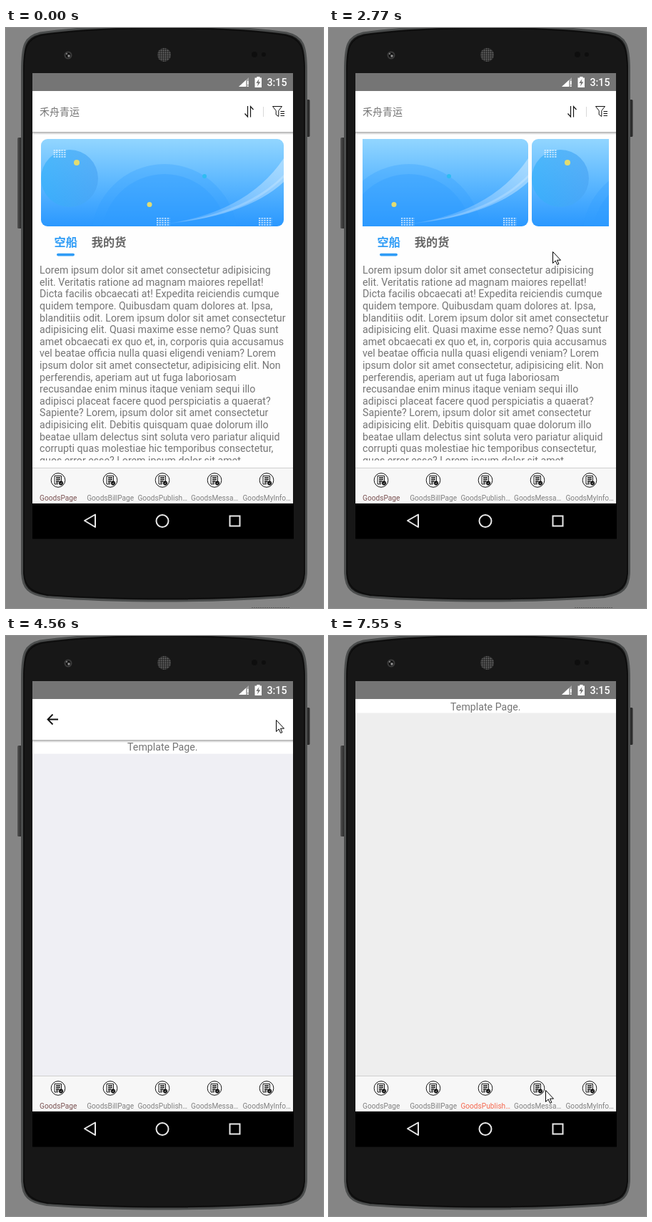
An HTML page that plays this animation: 444 px wide and 810 px high, repeating every 8000 ms.

```html
<!DOCTYPE html>
<html lang="zh">
<head>
<meta charset="utf-8">
<title>Goods app</title>
<style>
html, body { margin: 0; width: 100%; height: 100%; overflow: hidden; background: #858585; }
svg { display: block; width: 444px; height: 810px; }
text { font-family: Roboto, "Noto Sans CJK SC", "Noto Sans CJK", sans-serif; font-size: 14.2px; fill: #757575; }
.mid { text-anchor: middle; }
.cn { font-family: "Noto Sans CJK SC", "Noto Sans CJK", sans-serif; }
.tab { font-size: 16.2px; font-weight: 700; }
.label { font-size: 10.14px; fill: #808080; text-anchor: middle; }
.line { fill: none; stroke: #111; stroke-width: 1.2; }

#slides, #edge, #enter, #third, #home, #bill, #publish, #cursor {
  animation: 8s step-end infinite;
}
#slides { animation-name: slide; }
#edge { animation-name: edge; }
#enter { animation-name: enter; transform: translateY(var(--y)); }
#third { animation-name: third; }
#home { animation-name: home; }
#bill { animation-name: bill; }
#publish { animation-name: publish; }
#cursor { animation-name: move; }

@keyframes slide {
  0%, 4.75%, 36.5%, 100% { transform: none; }
  2.6%, 34.6% { transform: translateX(-110px); }
  3.6%, 35.6% { transform: translateX(-300px); }
}
@keyframes edge { 0% { opacity: 1; } 50.1%, 100% { opacity: 0; } }
/* page, panel, arrow, caption and outline opacity, then the rise */
@keyframes enter {
  0%  { --page: 0; --panel: 0; --arrow: 0; --caption: 0; --outline: 0; --y: 40px; }
  53% { --page: .12; --panel: .1; --arrow: .04; --caption: .1; --outline: 0; --y: 36px; }
  54% { --page: .62; --panel: .56; --arrow: .27; --caption: .9; --outline: 1; --y: 18px; }
  55% { --page: .96; --panel: .9; --arrow: .73; --caption: 1; --outline: .3; --y: 4px; }
  56% { --page: 1; --panel: 1; --arrow: .96; --caption: 1; --outline: 0; --y: .5px; }
  57%, 100% { --page: 1; --panel: 1; --arrow: 1; --caption: 1; --outline: 0; --y: 0px; }
}
.page { opacity: var(--page); }
.panel { opacity: var(--panel); }
.arrow { opacity: var(--arrow); }
.caption { opacity: var(--caption); }
.outline { opacity: var(--outline); }
@keyframes third { 0% { opacity: 0; } 82%, 100% { opacity: 1; } }
@keyframes home { 0% { fill: #7a5252; } 82%, 100% { fill: #808080; } }
@keyframes bill { 0%, 91.5%, 100% { fill: #808080; } 82% { fill: #f4674e; } }
@keyframes publish { 0% { fill: #808080; } 91.5%, 100% { fill: #f4674e; } }
</style>
</head>
<body>
<svg viewBox="0 0 444 810" xmlns="http://www.w3.org/2000/svg">
  <defs>
    <linearGradient id="sky" x2="0" y2="1">
      <stop offset="0" stop-color="#92d6ff"/><stop offset=".5" stop-color="#5cb7ff"/><stop offset="1" stop-color="#2a98ff"/>
    </linearGradient>
    <linearGradient id="globe" x2="1" y2="0">
      <stop offset="0" stop-color="#35b0fa"/><stop offset="1" stop-color="#4aa5f4"/>
    </linearGradient>
    <linearGradient id="trail">
      <stop offset="0" stop-color="#fff" stop-opacity=".05"/><stop offset="1" stop-color="#fff" stop-opacity=".38"/>
    </linearGradient>
    <linearGradient id="shade" x2="0" y2="1">
      <stop offset="0" stop-color="#aaa"/><stop offset="1" stop-color="#aaa" stop-opacity="0"/>
    </linearGradient>
    <linearGradient id="key"><stop offset="0" stop-color="#555"/><stop offset="1" stop-color="#222"/></linearGradient>
    <pattern id="mesh" width="3" height="3" patternUnits="userSpaceOnUse">
      <rect width="3" height="3" fill="#2a2a2a"/><circle cx="1.5" cy="1.5" r=".95" fill="#6c6c6c"/>
    </pattern>
    <pattern id="dots" width="3.7" height="3" patternUnits="userSpaceOnUse">
      <rect width="2.2" height="1.7" fill="#fff" fill-opacity=".75"/>
    </pattern>
    <clipPath id="view"><rect x="37" y="88" width="365" height="526"/></clipPath>
    <clipPath id="strip"><rect x="47" y="155" width="345" height="122"/></clipPath>
    <clipPath id="card"><rect x="49" y="155" width="340" height="122" rx="9"/></clipPath>
    <clipPath id="scroll"><rect x="37" y="320" width="365" height="284"/></clipPath>

    <g id="banner" clip-path="url(#card)">
      <rect x="49" y="155" width="340" height="122" fill="url(#sky)"/>
      <circle cx="89" cy="210" r="40" fill="url(#globe)" opacity=".7"/>
      <circle cx="222" cy="292" r="102" fill="#2f9bff" opacity=".3"/>
      <circle cx="222" cy="292" r="88" fill="#2f9bff" opacity=".35"/>
      <path d="M210 275Q335 262 389 182V215Q335 265 210 275Z" fill="url(#trail)"/>
      <path d="M240 271Q340 255 389 205V209Q335 262 240 271Z" fill="#fff" opacity=".2"/>
      <g fill="url(#dots)">
        <rect width="18.5" height="12" transform="translate(66.500 170)"/>
        <rect width="18.5" height="12" transform="translate(211 265)"/>
        <rect width="18.5" height="12" transform="translate(354 265)"/>
      </g>
      <circle cx="99" cy="188" r="4" fill="#e2dc72"/>
      <circle cx="201" cy="246.500" r="3.500" fill="#e2dc72"/>
      <circle cx="278" cy="207" r="3" fill="#2fbcf2"/>
    </g>

    <g id="bar">
      <rect x="37" y="88" width="365" height="57.500" fill="#fff"/>
      <rect x="37" y="145" width="365" height="4" fill="url(#shade)"/>
    </g>

    <g id="note" class="line" style="stroke-width:1">
      <circle r="9.800" fill="#fff"/>
      <path d="M-5 -6H4.500V1M-5 -6V5.500H0"/>
      <path d="M-3 -3.500H3M-3 -1H3M-3 1.500H1.500M-3 3.700H0" stroke-width="1.300"/>
      <circle cx="4" cy="4" r="2.700" fill="#111"/>
      <path d="M2.800 4L3.800 5L5.400 3.200" stroke="#fff" stroke-width=".7"/>
    </g>
  </defs>

  <!-- handset -->
  <rect width="444" height="810" fill="#858585"/>
  <rect x="16" y="153" width="6" height="127" rx="1.500" fill="url(#key)"/>
  <rect x="420" y="100" width="5.500" height="52" rx="1.500" fill="#2c2c2c"/>
  <path d="M22.500 60C22.500 24 26 12 48 7Q110 -2 221 -3Q332 -2 393 7C416 12 420.500 24 420.500 60V758C420.500 783 411 791 386 794.500Q310 800 221 800Q132 800 57 794.500C32 791 22.500 783 22.500 758Z" fill="#191919" stroke="#4b4d4d" stroke-width="3"/>
  <path d="M25 62C25 27 29 15 50 10Q110 1 221 0Q332 1 391 10C413 15 418 27 418 62V757C418 780 408 788 384 792Q310 797 221 797Q132 797 59 792C35 788 25 780 25 757Z" fill="#171717" stroke="#0c0c0c" stroke-width="1.500"/>
  <circle cx="87" cy="38" r="5.500" fill="#3b3b3b"/><circle cx="87" cy="38" r="3.500" fill="#111"/>
  <circle cx="88" cy="39" r="1.700" fill="#999"/><circle cx="85" cy="36" r="1.200" fill="#777"/>
  <circle cx="221.500" cy="37.500" r="9.500" fill="url(#mesh)"/>
  <circle cx="348" cy="37" r="4" fill="#0e0e0e"/><circle cx="361" cy="37" r="3" fill="#0e0e0e"/>
  <path id="edge" d="M344 809.500H397" stroke="#5c5c5c" stroke-dasharray="2 1"/>

  <!-- status bar -->
  <rect x="37" y="63" width="365" height="25" fill="#757575"/>
  <path d="M326 82L340 69V82Z" fill="#a9a9a9"/>
  <path d="M326 82L336 72.700V82Z" fill="#fff"/>
  <path d="M338.800 74V79M338.800 80.500V82" stroke="#fff" stroke-width="1.600"/>
  <path d="M348.500 69.500H351.300V68H355.500V69.500H358V83H348.500Z" fill="#fff"/>
  <path d="M354.500 71L350.300 77H353L352 81.500L356.400 75.300H353.600Z" fill="#757575"/>
  <text x="365.500" y="81" style="fill:#fff;font-weight:500">3:15</text>

  <g clip-path="url(#view)">
    <!-- first page -->
    <rect x="37" y="88" width="365" height="526" fill="#fefefe"/>
    <use href="#bar"/>
    <text class="cn" x="47" y="122" style="font-size:14px">禾舟青运</text>
    <path class="line" d="M338.500 109V124L334.500 119.500M342.500 124.500V109.500L346.500 114"/>
    <path d="M360.500 110V124" stroke="#d8d8d8"/>
    <path class="line" d="M373.500 109.500H386.500L381.800 115.500V123.500L378.200 121V115.500ZM384.500 116.500H390M384.500 119.500H390M384.500 122.500H390" style="stroke-width:1"/>
    <g clip-path="url(#strip)">
      <g id="slides"><use href="#banner"/><use href="#banner" x="345"/></g>
    </g>
    <text class="cn tab" x="67.500" y="304.500" style="fill:#2f9cf6">空船</text>
    <text class="cn tab" x="119.800" y="304.500" style="fill:#666">我的货</text>
    <rect x="71" y="314.800" width="25" height="3.600" rx="1.800" fill="#2f9cf6"/>
    <g clip-path="url(#scroll)"><text id="lorem"></text></g>

    <!-- second page -->
    <g id="enter">
      <rect class="page" x="37" y="88" width="365" height="576" fill="#efeff4"/>
      <rect class="panel" x="37" y="145" width="365" height="19.500" fill="#fff"/>
      <use class="panel" href="#bar"/>
      <path class="outline" d="M39 88.500H400M41 90L46 144M398 90L393 144" fill="none" stroke="#e4e4e4" stroke-width="1.500"/>
      <path class="line arrow" d="M73 116.500H58.500M65.500 109.500L58.500 116.500L65.500 123.500" style="stroke-width:1.800"/>
      <text class="mid caption" x="219.300" y="160">Template Page.</text>
    </g>

    <!-- tab pages -->
    <g id="third">
      <rect x="37" y="88" width="365" height="526" fill="#eee"/>
      <rect x="37" y="88" width="365" height="19.500" fill="#fff"/>
      <text class="mid" x="219.300" y="103.500">Template Page.</text>
    </g>
  </g>

  <!-- tab bar -->
  <rect x="37" y="614" width="365" height="50" fill="#f7f7f7"/>
  <path d="M37 614.500H402" stroke="#cfcfcf"/>
  <use href="#note" x="73" y="631.500"/><use href="#note" x="146" y="631.500"/>
  <use href="#note" x="219" y="631.500"/><use href="#note" x="292" y="631.500"/>
  <use href="#note" x="365" y="631.500"/>
  <text class="label" id="home" x="73.200" y="660">GoodsPage</text>
  <text class="label" id="bill" x="146.200" y="660">GoodsBillPage</text>
  <text class="label" id="publish" x="219.200" y="660">GoodsPublish…</text>
  <text class="label" x="292.200" y="660">GoodsMessa…</text>
  <text class="label" x="365.200" y="660">GoodsMyInfo…</text>

  <!-- navigation keys -->
  <rect x="37" y="664" width="366" height="49.500"/>
  <g fill="none" stroke="#e8e8e8" stroke-width="2">
    <path d="M110 688L125 679.500V697Z" stroke-linejoin="round"/>
    <circle cx="219" cy="688.500" r="8.500"/>
    <rect x="313.500" y="681.500" width="14" height="14"/>
  </g>

  <path id="cursor" d="M.5 .5V16.500L4.200 13L6.700 18.500L8.900 17.500L6.500 12.200H11.500Z" fill="#fff" stroke="#000"/>
</svg>
<script>
const LOOP = 8000;

const lines = [
  "Lorem ipsum dolor sit amet consectetur adipisicing",
  "elit. Veritatis ratione ad magnam maiores repellat!",
  "Dicta facilis obcaecati at! Expedita reiciendis cumque",
  "quidem tempore. Quibusdam quam dolores at. Ipsa,",
  "blanditiis odit. Lorem ipsum dolor sit amet consectetur",
  "adipisicing elit. Quasi maxime esse nemo? Quas sunt",
  "amet obcaecati ex quo et, in, corporis quia accusamus",
  "vel beatae officia nulla quasi eligendi veniam? Lorem",
  "ipsum dolor sit amet consectetur, adipisicing elit. Non",
  "perferendis, aperiam aut ut fuga laboriosam",
  "recusandae enim minus itaque veniam sequi illo",
  "adipisci placeat facere quod perspiciatis a quaerat?",
  "Sapiente? Lorem, ipsum dolor sit amet consectetur",
  "adipisicing elit. Debitis quisquam quae dolorum illo",
  "beatae ullam delectus sint soluta vero pariatur aliquid",
  "corrupti quas molestiae hic temporibus consectetur,",
  "quos error esse? Lorem ipsum dolor sit amet"
];
document.getElementById("lorem").innerHTML = lines
  .map((s, i) => `<tspan x="47" y="${(343.2 + i * 16.6).toFixed(1)}">${s}</tspan>`).join("");

// Pointer strokes: start, end, number of steps, points passed
const strokes = [
  [840, 990, 3, [[364, 805], [392, 776], [409, 753]]],
  [1310, 1540, 4, [[420, 750], [398, 766], [345, 772], [296, 762]]],
  [1770, 2310, 8, [[294, 742], [325, 690], [368, 645], [404, 633], [415, 650]]],
  [2460, 2920, 7, [[408, 632], [362, 510], [315, 385], [318, 280], [349, 203]]],
  [3090, 3860, 11, [[352, 195], [365, 160], [374, 128], [377, 119], [378, 117]]],
  [4780, 5550, 11, [[372, 122], [300, 185], [200, 207], [154, 190], [205, 160], [254, 154]]],
  [5620, 6080, 7, [[260, 170], [225, 330], [165, 520], [135, 620], [145, 643]]],
  [6250, 6250, 1, [[145, 644]]],
  [6710, 7100, 6, [[155, 644], [185, 640], [216, 638]]],
  [7320, 7550, 4, [[230, 642], [265, 638], [303, 634]]]
];

// Smooth curve through the points, u from 0 to 1
function along(pts, u) {
  const last = pts.length - 1;
  const i = Math.min(Math.floor(u * last), Math.max(last - 1, 0));
  const f = u * last - i;
  const at = k => pts[Math.max(0, Math.min(last, k))];
  return [0, 1].map(n => {
    const [a, b, c, d] = [at(i - 1)[n], at(i)[n], at(i + 1)[n], at(i + 2)[n]];
    return Math.round(b + f / 2 * (c - a + f * (2 * a - 5 * b + 4 * c - d + f * (3 * (b - c) + d - a))));
  });
}

let frames = "0%{opacity:0}", end;
for (const [from, to, steps, pts] of strokes) {
  for (let k = 0; k < steps; k++) {
    const u = steps > 1 ? k / (steps - 1) : 0;
    const time = Math.floor((from + (to - from) * u) / 10) * 10;
    const [x, y] = along(pts, u);
    end = `{opacity:1;transform:translate(${x}px,${y}px)}`;
    frames += `${(time / LOOP * 100).toFixed(3)}%${end}`;
  }
}
const sheet = document.createElement("style");
sheet.textContent = `@keyframes move{${frames}100%${end}}`;
document.head.append(sheet);
</script>
</body>
</html>
```
